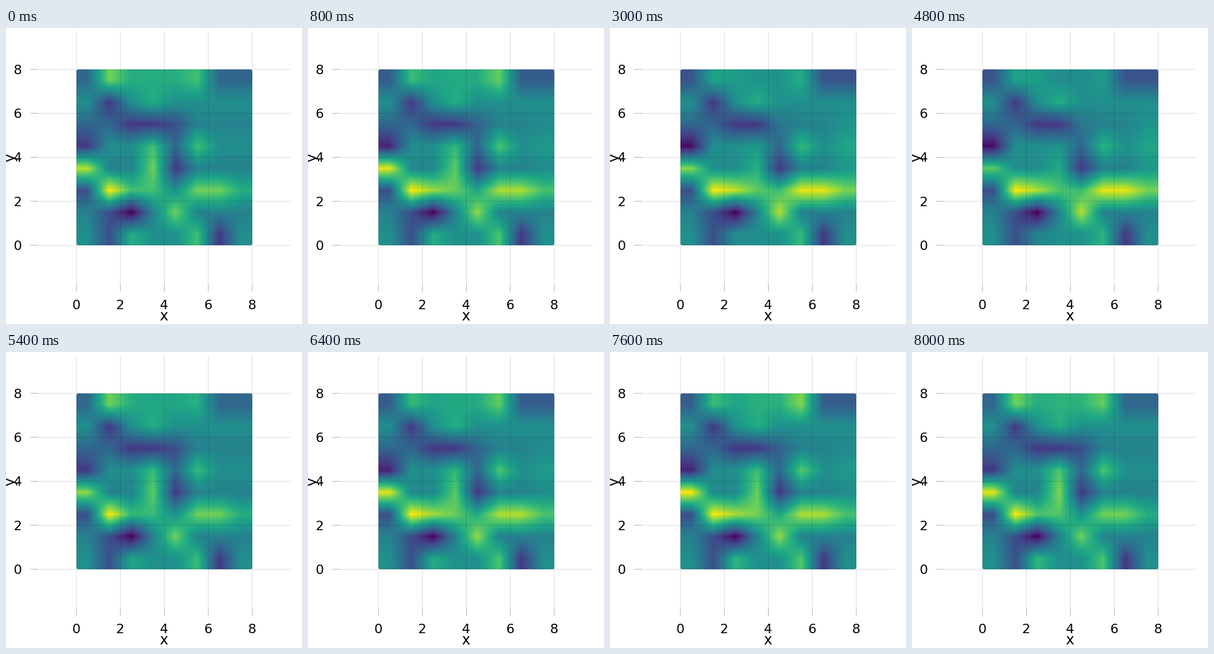
These frames come from a looping animation (500x500 px, 8200 ms). A matplotlib script:

```python
import numpy as np
import matplotlib.pyplot as plt
from matplotlib.animation import FuncAnimation
from matplotlib.patches import FancyBboxPatch

SIZE, DPI = 500, 100
FRAMES, STEP = 41, 200
LEFT, TOP, SIDE = 119, 70, 297
N = 8
PX = 72 / DPI

# Hills and hollows: level in percent and the (x, y) cells that have it.
TERRAIN = {
    0: [(2, 1)],
    16: [(1, 6), (2, 5), (3, 5), (0, 4), (4, 3), (6, 0)],
    24: [(0, 2), (1, 1), (1, 0), (4, 5)],
    33: [(0, 5), (1, 5), (4, 4), (0, 7), (6, 7), (7, 7)],
    62: [(2, 7), (3, 7), (4, 7), (3, 6), (7, 2), (2, 0)],
    70: [(5, 7), (3, 4), (5, 4), (2, 2), (3, 2), (5, 0)],
    79: [(1, 7), (3, 3), (5, 2), (6, 2), (4, 1)],
    90: [(0, 3)],
    100: [(1, 2)],
}


def make_terrain():
    rows = np.arange(N)[:, None]
    field = 47 + 3 * np.cos(np.pi * rows) + np.zeros((N, N))
    for level, cells in TERRAIN.items():
        for x, y in cells:
            field[y, x] = level
    return field


def make_mode(*parts):
    """Pattern of change from (rows and columns, gain) pairs."""
    mode = np.zeros((N, N))
    for where, gain in parts:
        mode[where] += gain
    return mode


at = np.s_
BASE = make_terrain()
# The lower ridge fills up while the top row sinks.
RIDGE = make_mode((at[2, 4:], 18), (at[2, 2], 25), (at[2, 3], 8),
                  (at[1, 4], 11), (at[7, :5], -7), (at[7, 6:], -7),
                  (at[7, 1], -14), (at[4, 0], -13), (at[5, 4], 15),
                  (at[3:5, 3], -12), (at[3:5, 7], 9), (at[3, 1:3], 5),
                  (at[0, 2], -8), (at[5, 7], 8))
# Separate hot spots glow and fade together.
FLARE = make_mode((at[3, 0], 16), (at[3:5, 3], 7), (at[2, 2:4], 7),
                  (at[0, 2], 10), (at[0, 5], 5), (at[7, 3:5], 7),
                  (at[7, 5], 17), (at[4, 5], 6))

TIMES = [0, 1600, 3000, 4800, 5400, 7200, 8000]
RIDGE_LEVEL = [0, 1, 1, 1, 0, 1, 0]
FLARE_LEVEL = [0, 0.8, -0.5, -0.9, -0.4, 1, 0.4]

# Bilinear weights from cell centres to pixels, held flat at the border.
pos = np.clip((np.arange(SIDE) + 0.5) * N / SIDE - 0.5, 0, N - 1)
WEIGHTS = np.maximum(0, 1 - np.abs(pos[:, None] - np.arange(N)))


def field_at(t):
    field = (BASE + RIDGE * np.interp(t, TIMES, RIDGE_LEVEL)
             + FLARE * np.interp(t, TIMES, FLARE_LEVEL))
    return WEIGHTS @ np.clip(field, 0, 100) @ WEIGHTS.T


fig = plt.figure(figsize=(SIZE / DPI, SIZE / DPI), dpi=DPI, facecolor="white")
ax = fig.add_axes([0, 0, 1, 1])
image = ax.imshow(field_at(0), cmap="viridis", vmin=0, vmax=100,
                  interpolation="nearest", aspect="auto", origin="lower",
                  extent=(LEFT, LEFT + SIDE, TOP + SIDE, TOP), zorder=1)
ax.set_xlim(0, SIZE)
ax.set_ylim(SIZE, 0)
ax.axis("off")
image.set_clip_path(FancyBboxPatch(
    (LEFT, TOP), SIDE, SIDE, boxstyle="round,pad=0,rounding_size=3",
    transform=ax.transData))


def line(xs, ys, alpha):
    ax.plot(xs, ys, color="black", alpha=alpha, lw=PX, zorder=2,
            solid_capstyle="butt", snap=False)


def label(x, y, text, px, **kw):
    ax.text(x, y, text, fontsize=px * PX, family="DejaVu Sans",
            ha="center", va="baseline", zorder=3, **kw)


for k in range(0, N + 1, 2):
    x = LEFT + SIDE * k / N
    y = TOP + SIDE * (N - k) / N
    line([x, x], [5, 433], 0.14)
    line([54, 481], [y, y], 0.14)
    line([x, x], [433, 445], 0.32)
    line([41, 54], [y, y], 0.32)
    label(x - 0.5, 475, str(k), 22)
    label(19.5, y + 8, str(k), 22)

label(266, 494, "x", 24)
label(14, 219, "y", 24, rotation=90, rotation_mode="anchor")


def update(frame):
    image.set_data(field_at(frame * STEP))
    return [image]


anim = FuncAnimation(fig, update, frames=FRAMES, interval=STEP, repeat=True,
                     repeat_delay=0)
plt.show()
```
